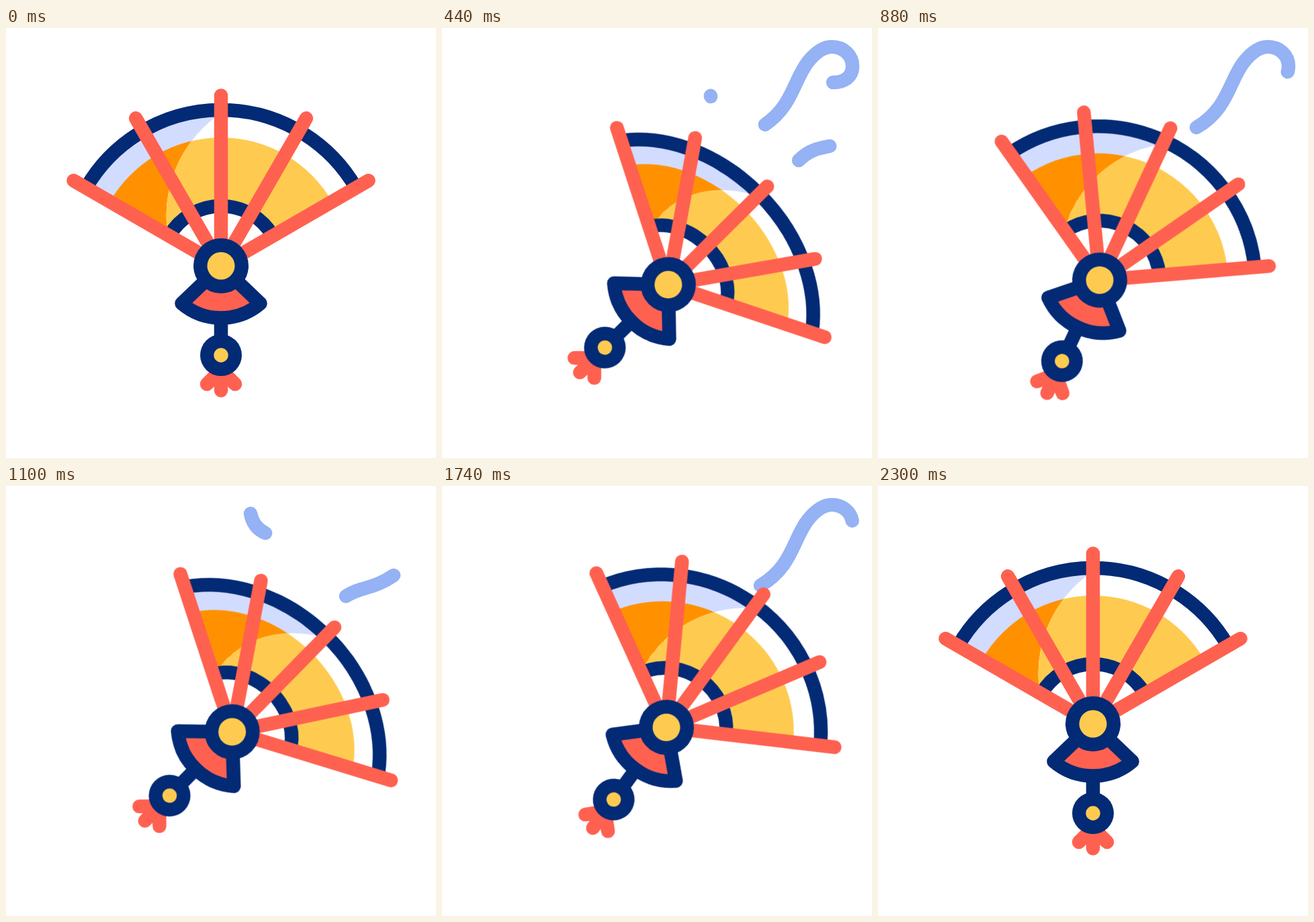
An HTML page for the animation above (2.6 s loop, 640 by 640 pixels).

```html
<!DOCTYPE html>
<html lang="en">
<head>
<meta charset="utf-8">
<title>Hand fan</title>
<style>
  @property --fold { syntax: "<number>"; inherits: true; initial-value: 0; }

  :root {
    --loop: 2600ms;
    --ease: cubic-bezier(.333, 0, .667, 1);
    --navy: #032a75;
    --red: #ff6150;
    --yellow: #fecb50;
  }
  html, body { margin: 0; width: 100%; height: 100%; overflow: hidden; background: #fff; }
  svg { display: block; width: 640px; height: 640px; }

  .bob, .swing, .fold, .short, .long { animation: var(--loop) var(--ease) infinite; }
  .bob { animation-name: bob; }
  .swing { animation-name: swing; transform-origin: 0 23.7px; }
  .fold { animation-name: fold; }

  .leaf { transform: translateY(calc(-13px * var(--fold))) scaleY(calc(1 - .236 * var(--fold))); }
  .rib { transform: scaleY(calc(1 - var(--squash) * var(--fold))); }
  .rib, .arc { vector-effect: non-scaling-stroke; }

  .line { fill: none; stroke-width: 20.5; stroke-linecap: round; stroke-linejoin: round; }
  .navy { stroke: var(--navy); }
  .red { stroke: var(--red); }
  .arc { fill: none; stroke: var(--navy); stroke-width: 20.5; }

  .wind { stroke: #94b2f4; }
  .short, .long { animation-delay: calc(var(--at) - var(--loop)); }
  .short { animation-name: short; }
  .long { animation-name: long; }

  @keyframes swing {
    0%, 6.42% { transform: rotate(0deg); }
    17.85%, 40.85%, 63.54% { transform: rotate(46deg); }
    29.42%, 51.92% { transform: rotate(14.2deg); }
    75.96% { transform: rotate(-7deg); }
    88.46%, 100% { transform: rotate(0deg); }
  }
  @keyframes bob {
    0%, 6.42%, 26.04%, 45.38%, 65.27%, 88.46%, 100% { transform: translateY(0); }
    16.23%, 35.85%, 55.46% { transform: translateY(21.3px); }
    75.08% { transform: translateY(9px); }
  }
  @keyframes fold {
    0%, 6.42%, 23.77%, 34.92%, 46.04%, 57.23%, 68.46%, 82.7%, 100% { --fold: 0; }
    17.85%, 29.23%, 40.62%, 51.46%, 62.81% { --fold: 1; }
    75% { --fold: .5; }
  }

  /* A gust grows from its start, then leaves through its end. */
  @keyframes short {
    0% { stroke-dasharray: 0 9; stroke-dashoffset: 0; opacity: 1; }
    5.77% { stroke-dasharray: 1 9; stroke-dashoffset: 0; }
    11.54% { stroke-dasharray: 0 9; stroke-dashoffset: -1; opacity: 1; }
    11.55%, 100% { stroke-dasharray: 0 9; stroke-dashoffset: -1; opacity: 0; }
  }
  @keyframes long {
    0% { stroke-dasharray: 0 9; stroke-dashoffset: 0; opacity: 1; }
    6.54% { stroke-dasharray: 1 9; stroke-dashoffset: 0; }
    13.08% { stroke-dasharray: 0 9; stroke-dashoffset: -1; opacity: 1; }
    13.09%, 100% { stroke-dasharray: 0 9; stroke-dashoffset: -1; opacity: 0; }
  }
</style>
</head>
<body>
<svg viewBox="0 0 640 640">
  <defs>
    <clipPath id="lit"><circle cx="103" cy="-74" r="184.5"/></clipPath>
    <path id="sheet" d="M0 0L-198 -114.3A228.6 228.6 0 0 1 198 -114.3Z"/>
    <path id="band" d="M0 0L-165.4 -95.5A191 191 0 0 1 165.4 -95.5Z"/>
    <path id="curl" pathLength="1" d="M474 148C522 120 523 77 545 50C558 34 570 28 580 28C598 28 611 41 611 57C611 72 600 81 582 81"/>
    <path id="puff" pathLength="1" d="M400 102C397 85 393 62 397 40"/>
  </defs>

  <g class="wind line">
    <use href="#curl" class="long" style="--at:253ms"/>
    <use href="#curl" class="long" style="--at:750ms"/>
    <use href="#curl" class="long" style="--at:1618ms"/>
    <use href="#puff" class="short" style="--at:428ms"/>
    <use href="#puff" class="short" style="--at:1163ms"/>
    <path class="long" style="--at:358ms" pathLength="1" d="M531 197C548 180 562 179 581 175C600 170 610 160 624 147"/>
    <path class="long" style="--at:930ms" pathLength="1" d="M506 164C528 149 545 155 577 133"/>
    <path class="short" style="--at:510ms" pathLength="1" d="M530 71Q512 62 506 41"/>
    <path class="short" style="--at:950ms" pathLength="1" d="M386 70Q368 62 364 41"/>
    <path class="short" style="--at:1230ms" pathLength="1" d="M305 126Q288 116 277 95"/>
  </g>

  <g transform="translate(320 354)">
    <g class="bob"><g class="swing">
      <g class="fold">
        <g class="leaf">
          <use href="#sheet" fill="#d2dcff"/>
          <use href="#band" fill="#ff9100"/>
          <g clip-path="url(#lit)">
            <use href="#sheet" fill="#fff"/>
            <use href="#band" fill="var(--yellow)"/>
          </g>
          <path fill="#fff" d="M0 0L-77.1 -44.5A89 89 0 0 1 77.1 -44.5Z"/>
          <path class="arc" d="M-77.1 -44.5A89 89 0 0 1 77.1 -44.5"/>
          <path class="arc" d="M-200.9 -116A232 232 0 0 1 200.9 -116"/>
        </g>
        <g class="line red">
          <path class="rib" style="--squash:.134" d="M0 0L-219.5 -126.8"/>
          <path class="rib" style="--squash:.174" d="M0 0L-126.8 -219.7"/>
          <path class="rib" style="--squash:.185" d="M0 0V-253.5"/>
          <path class="rib" style="--squash:.174" d="M0 0L126.8 -219.7"/>
          <path class="rib" style="--squash:.134" d="M0 0L219.5 -126.8"/>
        </g>
      </g>

      <path class="line red" d="M0 150V185.5M0 155L-21 176M0 155L21 176"/>
      <path class="line navy" d="M0 77V110"/>
      <path class="line navy" style="fill:var(--red)" d="M0 0L-58.5 56A90 90 0 0 0 58.5 56Z"/>
      <circle r="41" fill="var(--navy)"/>
      <circle r="20.5" fill="var(--yellow)"/>
      <circle cy="133" r="31" fill="var(--navy)"/>
      <circle cy="133" r="10.7" fill="var(--yellow)"/>
    </g></g>
  </g>
</svg>
</body>
</html>
```
